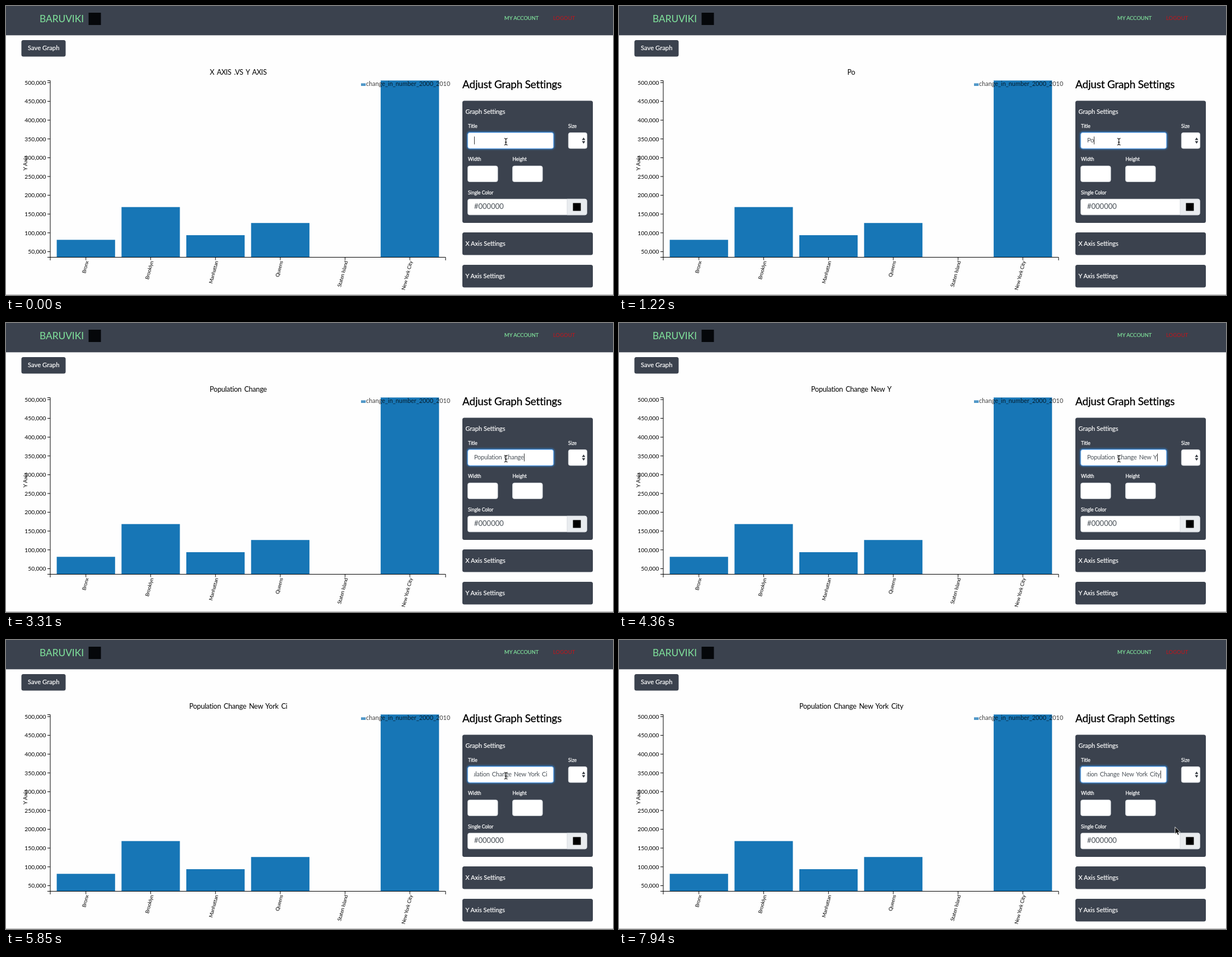
Write an HTML page that moves like this. It is 1084 by 517 pixels and loops after 8000 ms.

```html
<!DOCTYPE html>
<html lang="en">
<head>
<meta charset="utf-8">
<title>Graph settings</title>
<style>
html, body { margin: 0; width: 100%; height: 100%; overflow: hidden; background: #fefefe; }
svg { display: block; width: 1084px; height: 517px; font-family: Lato, sans-serif; }
.title { font-size: 12.6px; letter-spacing: -.25px; word-spacing: 1.8px; }
.field { font-size: 11px; letter-spacing: -.25px; word-spacing: 1.6px; fill: #495057; }
.tick { font-size: 10.3px; }
.cat { font-size: 9px; letter-spacing: -.2px; }
.head { font-size: 11px; fill: #fff; stroke: #fff; stroke-width: .2px; }
.label { font-size: 8.6px; fill: #fff; stroke: #fff; stroke-width: .25px; }
.option { font: 600 11px Inter, sans-serif; letter-spacing: .2px; }
</style>
</head>
<body>
<svg id="stage" viewBox="0 0 1084 517" xmlns="http://www.w3.org/2000/svg">
  <defs>
    <filter id="glow" x="-10%" y="-40%" width="120%" height="180%"><feGaussianBlur stdDeviation="1.6"/></filter>
    <clipPath id="inner"><rect x="835.5" y="228" width="132" height="25"/></clipPath>
  </defs>
</svg>
<script>
const LOOP = 8000, DARK = '#3b424e', BLUE = '#1776b6', GREEN = '#80e39c';
const stage = document.getElementById('stage');

function add(tag, attrs, parent = stage) {
  const el = document.createElementNS(stage.namespaceURI, tag);
  for (const k in attrs) el.setAttribute(k, attrs[k]);
  parent.append(el);
  return el;
}
const rect = (x, y, width, height, fill, more, parent) =>
  add('rect', { x, y, width, height, fill, ...more }, parent);
const path = (d, more, parent) => add('path', { d, ...more }, parent);
function text(x, y, str, cls, more, parent) {
  const el = add('text', { x, y, class: cls, ...more }, parent);
  el.textContent = str;
  return el;
}
const box = (x, y, w, h) => rect(x, y, w, h, '#fff', { rx: 3.5, stroke: '#ced4da', 'stroke-width': .7 });
const show = (el, on) => el.setAttribute('visibility', on ? 'visible' : 'hidden');

// Header
rect(0, 0, 1084, 517, '#fefefe');
rect(0, 0, 1084, 52.4, DARK);
rect(0, 516, 1084, 1, '#b0b0b0');
text(60, 29, 'BARUVIKI', '', { 'font-size': 17.3, fill: GREEN });
rect(147.5, 12, 22, 22, '#05070a');
text(890, 24.5, 'MY ACCOUNT', '', { 'font-size': 9.3, fill: GREEN, stroke: GREEN, 'stroke-width': .2 });
text(977, 24.5, 'LOGOUT', '', { 'font-size': 9.5, fill: '#c4141b' });
rect(27.5, 61, 79, 29.5, DARK, { rx: 3.5 });
text(39, 79, 'Save Graph', 'head', { style: 'font-size:11.3px' });

// Chart
const names = ['Bronx', 'Brooklyn', 'Manhattan', 'Queens', 'Staten Island', 'New York City'];
const tops = [418.3, 359.7, 410, 388.2, 449.5, 133.3];
names.forEach((name, i) => {
  const cx = 142.7 + 115.7 * i;
  rect(cx - 52.1, tops[i], 104.2, 449.5 - tops[i], BLUE);
  path(`M${cx} 449.5v5`, { stroke: '#000' });
  text(0, 0, name, 'cat', { 'text-anchor': 'end', transform: `translate(${cx + 5} 457) rotate(-75)` });
});
path('M74 133.5H79V449.5H74M79 455V449.5H785V455', { fill: 'none', stroke: '#000' });
for (let i = 0; i < 10; i++) {
  const y = 137 + 33.6 * i;
  path(`M74 ${y}h5`, { stroke: '#000' });
  text(71.5, y + 3.7, 500 - 50 * i + ',000', 'tick', { 'text-anchor': 'end' });
}
text(0, 0, 'Y Axis', '', { 'font-size': 10, 'text-anchor': 'middle', transform: 'translate(38 281) rotate(-90)' });
rect(634, 138.3, 8.3, 4.7, BLUE, { opacity: .75 });
text(643, 143, 'change_in_number_2000_2010', '', { 'font-size': 10.9, opacity: .75 });
const title = text(414.8, 123, '', 'title', { 'text-anchor': 'middle' });

// Settings
text(815, 147, 'Adjust Graph Settings', '',
  { 'font-size': 19, 'letter-spacing': -.2, stroke: '#000', 'stroke-width': .3 });
for (const [y, h, label, base] of [[169.5, 218.5, 'Graph Settings', 193],
  [405, 40.5, 'X Axis Settings', 429], [463, 40.5, 'Y Axis Settings', 487]]) {
  rect(815, y, 233, h, DARK, { rx: 3.5 });
  text(820.5, base, label, 'head');
}
for (const [x, y, s] of [[825, 218, 'Title'], [1004, 218, 'Size'], [825, 277, 'Width'],
  [904.5, 277, 'Height'], [825, 337, 'Single Color']]) text(x, y, s, 'label');

rect(823, 224.5, 156.5, 32, '#2f85d8', { rx: 5, opacity: .75, filter: 'url(#glow)' });
rect(824.7, 226.5, 153, 28.5, '#fff', { rx: 3.5, stroke: '#80bdff' });
box(1004.3, 226.5, 33.4, 28.5);
path('M1028.5 239.7h6l-3-4.4zM1028.5 241.8h6l-3 4.4z', { fill: '#343a40' });
box(824.5, 286, 53.7, 28.5);
box(904.5, 286, 53.7, 28.5);
box(824.5, 345.3, 212.8, 28.5);
path('M1002 345.3H1033.8a3.5 3.5 0 0 1 3.5 3.5V370.3a3.5 3.5 0 0 1-3.5 3.5H1002z',
  { fill: '#e9ecef', stroke: '#ced4da', 'stroke-width': .7 });
rect(1012.5, 352.5, 14, 14, '#000');
text(836, 362.5, '#000000', '', { 'font-size': 13, fill: '#495057' });

const clip = add('g', { 'clip-path': 'url(#inner)' });
const field = text(836, 243.7, '', 'field', {}, clip);
const caret = rect(836, 233.5, 1, 14, '#333');

const menu = add('g', {});
rect(825, 256, 153.7, 42.3, '#fff', { stroke: '#84b8e6' }, menu);
text(832, 271.5, 'Pasta', 'option', {}, menu);
text(832, 292, 'PAsta', 'option', {}, menu);

// Pointers
const beam = add('g', { fill: 'none' });
const beamPath = 'M889.7 236.7q3 0 3 2.2v7.6q0 2.2-3 2.2M895.7 236.7q-3 0-3 2.2v7.6q0 2.2 3 2.2M891 243.6h3.4';
path(beamPath, { stroke: '#fff', 'stroke-width': 2.2, opacity: .7 }, beam);
path(beamPath, { stroke: '#111', 'stroke-width': 1.1 }, beam);
const arrow = path('M0 0V12.8L2.9 10.1 5 14.8 7.2 13.8 5.2 9.3H9.2Z',
  { fill: '#000', stroke: '#fff', 'stroke-width': .9 });

// [time, typed letters]
const phrase = 'Population Change New York City';
const keys = [[0, 0], [450, 1], [1070, 2], [1660, 4], [2260, 10], [2710, 12], [3310, 17], [3760, 19],
  [4360, 23], [4800, 25], [5250, 28], [5400, 29], [6000, 30], [6440, 31]];
// [time, x, y] of the arrow tip
const moves = [[6590, 997, 240.5], [6740, 1028, 264], [7040, 1020, 232], [7190, 980, 206], [7340, 930, 201],
  [7490, 887, 208], [7640, 925, 262], [7790, 970, 305], [7940, 993, 334.5]];
const at = (list, t) => list.filter(k => k[0] <= t).pop();

function draw(t) {
  const typed = phrase.slice(0, at(keys, t)[1]);
  title.textContent = typed || 'X AXIS .VS Y AXIS';
  field.textContent = typed;
  const width = typed ? field.getComputedTextLength() : 0;
  const shift = Math.max(0, width - 130.5);
  field.setAttribute('x', 836 - shift);
  caret.setAttribute('x', Math.round(836 + width - shift));
  show(caret, t < 5850 || t >= 6000);
  show(menu, t >= 620 && t < 1220);

  const pos = at(moves, t);
  show(beam, !pos);
  show(arrow, pos);
  if (pos) arrow.setAttribute('transform', `translate(${pos[1]} ${pos[2]})`);
}

const start = performance.now();
function tick() {
  draw((performance.now() - start) % LOOP);
  requestAnimationFrame(tick);
}
draw(0);
requestAnimationFrame(tick);
</script>
</body>
</html>
```
